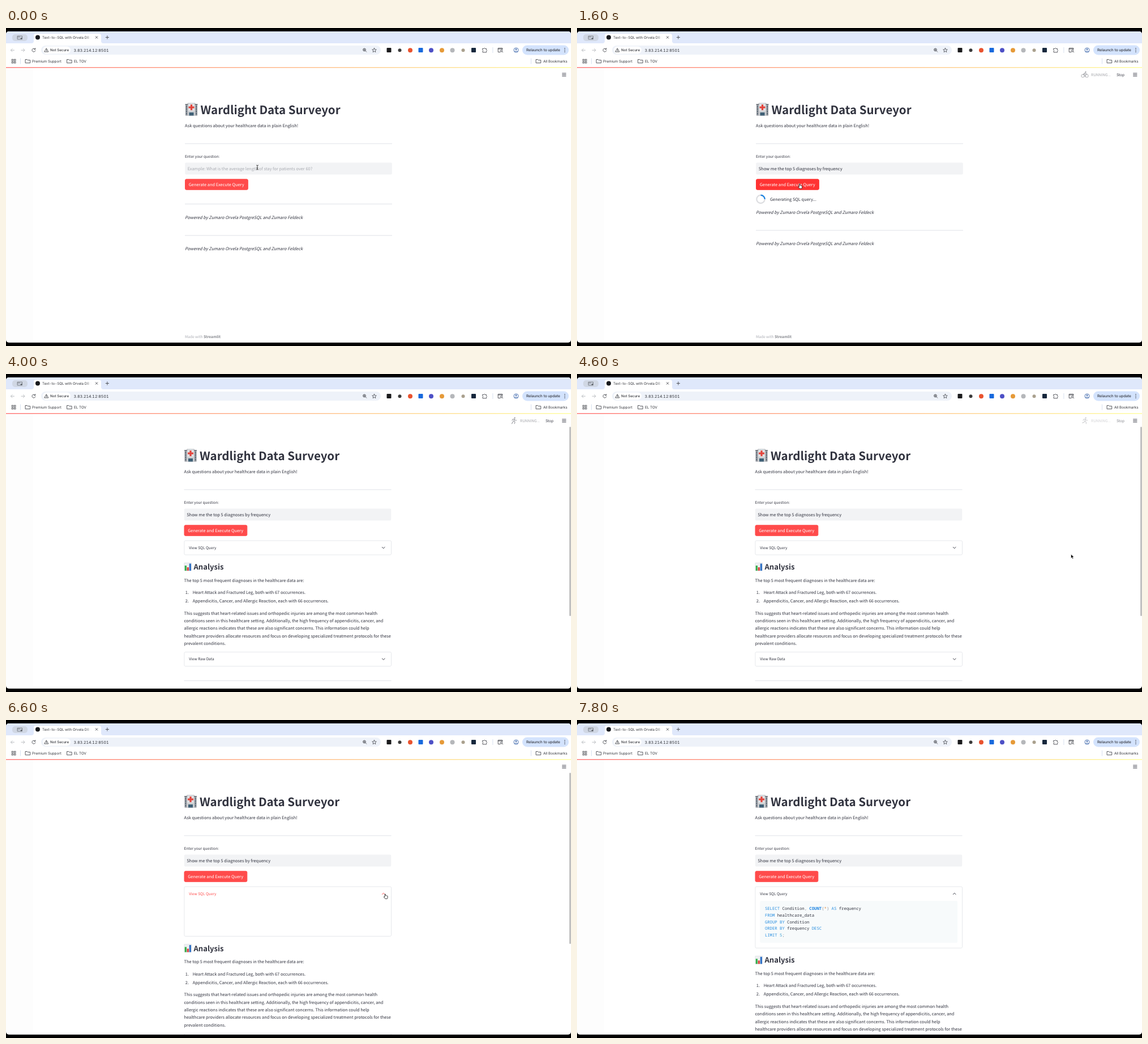
These frames come from a looping animation (998 by 561 pixels, 8 s). An HTML page:

```html
<!DOCTYPE html>
<html lang="en">
<head>
<meta charset="utf-8">
<title>Text-to-SQL demo</title>
<style>
html, body { margin: 0; width: 100%; height: 100%; overflow: hidden; background: #000; }
svg { display: block; width: 998px; height: 561px; }
text { text-rendering: geometricPrecision; white-space: pre; }
.page text { font-family: "Noto Sans CJK JP", "Noto Sans CJK SC", "Noto Sans CJK KR", "Open Sans", sans-serif; fill: #31333f; }
.chrome text { font-family: Inter, Roboto, sans-serif; fill: #32343a; font-feature-settings: "tnum"; }
.page .code { font-family: "Noto Sans Mono", "DejaVu Sans Mono", monospace; }
.line { fill: none; stroke-linecap: round; stroke-linejoin: round; }
</style>
</head>
<body>
<svg viewBox="0 0 998 561">
  <defs>
    <linearGradient id="strip"><stop stop-color="#ff4b4b"/><stop offset="1" stop-color="#fffd80"/></linearGradient>
    <linearGradient id="fade"><stop stop-color="#fff" stop-opacity="0"/><stop offset="1" stop-color="#fff"/></linearGradient>
  </defs>
  <rect y="6" width="998" height="549" rx="5" fill="#fff"/>
  <rect y="71" width="48" height="479" fill="#fdfdfd"/>
  <g class="page" id="page"></g>
  <g class="chrome" id="chrome"></g>
  <rect y="555" width="998" height="6"/>
  <g id="pointer"></g>
</svg>
<script>
const LOOP = 8000, STEP = 200;
const BODY = 7.45, SMALL = 6.52;
const INK = '#31333f', RED = '#ff4b4b', BLUE = '#1c83e1', EDGE = '#e0e2e7';
const QUESTION = 'Show me the top 5 diagnoses by frequency';
const CREDIT = 'Powered by Zumaro Orvela PostgreSQL and Zumaro Feldeck';

const $ = id => document.getElementById(id);
const text = (x, y, s, size = BODY, extra = '') => `<text x="${x}" y="${y}" font-size="${size}" ${extra}>${s}</text>`;
const rect = (x, y, w, h, fill, rx = 0, extra = '') =>
  `<rect x="${x}" y="${y}" width="${w}" height="${h}" fill="${fill}" rx="${rx}" ${extra}/>`;
const dot = (x, y, r, fill, extra = '') => `<circle cx="${x}" cy="${y}" r="${r}" fill="${fill}" ${extra}/>`;
const line = (d, color = '#45474d', w = 0.9) => `<path class="line" d="${d}" stroke="${color}" stroke-width="${w}"/>`;
const at = (x, y, s, extra = '') => `<g transform="translate(${x} ${y})" ${extra}>${s}</g>`;
const fill = color => `style="fill:${color}"`;
const rule = y => rect(316, y - 0.5, 366, 1, EDGE);
const credit = y => text(316, y, CREDIT, BODY, 'font-style="italic"');

function browser() {
  const folder = x => line(`M${x} 55.5h2.8l1 1.2h4.4v5h-8.2z`);
  const ring = (x, y, r) => dot(x, y, r, 'none', 'stroke="#45474d" stroke-width=".9"');
  const tab = 'M45 27q4 0 4-4v-9q0-4 4-4h111q4 0 4 4v9q0 4 4 4z';
  let s = rect(0, 6, 998, 21, '#dfe8fb', 5) + rect(0, 14, 998, 13, '#dfe8fb')
    + rect(0, 27, 998, 42, '#fff')
    + rect(11, 11, 27, 12, '#d0d7e4', 5)
    + line('M20.5 14.2h8v5.6h-8zM20.5 16h4', '#666b73', 0.8) + dot(27, 18.5, 1.4, '#666b73')
    + `<path d="${tab}" fill="#fff"/>` + dot(56, 16.5, 4, '#17191d')
    + text(64, 18.8, 'Text-to-SQL with Orvela DB S', 6.2)
    + rect(140, 11, 11, 12, 'url(#fade)') + rect(151, 11, 3, 12, '#fff')
    + line('M158.2 14.7l3.6 3.6m0-3.6l-3.6 3.6') + line('M176.2 16.5h5.4m-2.7-2.7v5.4')
    + line('M14.5 39.2h-6m2.6-2.6l-2.6 2.6l2.6 2.6M27 39.2h6m-2.6-2.6l2.6 2.6l-2.6 2.6', '#b4b7bc')
    + line('M51.4 37.3a3 3 0 1 0 .5 2.6M51.8 35.6v2.1h-2.1')
    + rect(62, 31, 600, 16, '#eef2f9', 8) + rect(65, 32.5, 49, 13, '#fff', 6.5)
    + line('M71.5 36l3.4 6h-6.8zM71.5 38.2v1.7m0 .9v.1', '#32343a', 0.8)
    + text(78, 41.4, 'Not Secure', 6.2, 'font-weight="500"')
    + text(119.5, 41.6, '3.83.214.12:8501', 7)
    + ring(633, 38.4, 2.4) + line('M634.8 40.2l2 2M631.8 38.4h2.4m-1.2-1.2v2.4', '#45474d', 0.8)
    + line('M650.5 35.4l1.1 2.5 2.7.2-2.1 1.8.7 2.7-2.4-1.5-2.4 1.5.7-2.7-2.1-1.8 2.7-.2z', '#45474d', 0.8);
  const squares = [[676.5, '#1b1b1d'], [732.5, '#1769dd'], [826, '#17283d']];
  const circles = [[695.5, '#3a3a3a', 3], [714, '#e9532f', 4], [751, '#4d50c6', 4], [770, '#e69a38', 4],
    [788.5, '#b5b7ba', 4], [807.5, '#aaa08e', 3]];
  for (const [x, c] of squares) s += rect(x - 4, 35, 8, 8, c, 1);
  for (const [x, c, r] of circles) s += dot(x, 39.2, r, c);
  s += line('M842 36.5h2q1-2.6 2 0h2.5v2.2q2.4 1 0 2.2v2h-6.5v-2q1.8-1.2 0-2.2z')
    + rect(859.5, 34, 0.8, 10, '#cdd9ec')
    + line('M873 42.5h-3.8v-7h7.6v2.6M869.2 37h7.5') + ring(875, 40.3, 1.6) + line('M876.2 41.5l1.4 1.4')
    + dot(901, 39, 4, 'none', 'stroke="#3f69ad" stroke-width=".9"') + dot(901, 37.8, 1.3, '#3f69ad')
    + line('M898.6 41.5q2.4-2 4.8 0', '#3f69ad')
    + rect(912, 30.5, 82, 17, '#d3e3fd', 8.5) + text(919, 41.3, 'Relaunch to update', 6.5, 'font-weight="500"');
  for (const y of [36, 39, 42]) s += dot(987, y, 0.8, '#32343a');
  for (const x of [10.2, 14.4]) for (const y of [55.2, 59.4])
    s += rect(x, y, 2.6, 2.6, 'none', 0, 'stroke="#45474d" stroke-width=".8"');
  s += rect(25, 53.5, 0.8, 10, '#cdd9ec') + folder(34.5) + text(46, 60.5, 'Premium Support', 6.3)
    + folder(108) + text(120, 60.5, 'EL TOV', 6.3)
    + rect(927, 53.5, 0.8, 10, '#cdd9ec') + folder(936.5) + text(949, 60.5, 'All Bookmarks', 6.3);
  return s + rect(0, 69.2, 998, 1.1, 'url(#strip)');
}

function hospital() {
  let s = rect(317, 135, 21, 19.5, '#8e9299', 0.5) + rect(320.5, 132, 14, 22.5, '#c9ccd0', 0.5)
    + rect(316.5, 134, 5, 1.5, '#6e737a') + rect(333.5, 134, 5, 1.5, '#6e737a')
    + rect(322, 133.3, 11, 13, '#dfe1e4')
    + rect(325.9, 135, 3.2, 10, '#e3453d') + rect(322.5, 138.4, 10, 3.2, '#e3453d')
    + rect(323.5, 149, 8, 5.5, '#3f6076');
  for (const y of [138, 142, 146, 150]) s += rect(318, y, 1.6, 2, '#596a78') + rect(335.4, y, 1.6, 2, '#596a78');
  return s;
}

const chart = y => rect(316.3, y - 7, 13, 14, '#eef0f2', 0.5, 'stroke="#d3d7dc" stroke-width=".5"')
  + rect(317.2, y - 2, 3.2, 9, '#35ad4b') + rect(321.2, y + 1, 3.2, 6, '#d8433c') + rect(325.2, y - 5.5, 3.2, 12.5, '#2e6fc4');

function spinner(y, label, angle) {
  const r = 7.2, a = (angle - 45) * Math.PI / 180, b = a + Math.PI / 2;
  const p = v => `${(324.5 + r * Math.cos(v)).toFixed(2)} ${(y + r * Math.sin(v)).toFixed(2)}`;
  return dot(324.5, y, r, 'none', 'stroke="#dcdde0" stroke-width="2.2"')
    + `<path d="M${p(a)}A${r} ${r} 0 0 1 ${p(b)}" fill="none" stroke="${BLUE}" stroke-width="2.2"/>`
    + text(341, y + 2.7, label);
}

function expander(y, label, open = 0, hot = false) {
  const c = hot ? RED : INK, m = y + 12.5, k = open ? -1 : 1;
  return rect(316.4, y, 365.6, 25 + open, '#fff', 2, `stroke="${EDGE}" stroke-width=".8"`)
    + text(324.8, m + 2.4, label, SMALL, fill(c))
    + line(`M665.8 ${m - k * 1.1}l2.4 ${k * 2.3}l2.4 ${-k * 2.3}`, c, 0.95);
}

function query() {
  const kw = s => `<tspan fill="#2a8fe0">${s}</tspan>`, op = s => `<tspan fill="#8b8e98">${s}</tspan>`;
  const rows = [
    `${kw('SELECT')} Condition${op(',')} <tspan fill="#1c83e1" font-weight="700">COUNT</tspan>${op('(')}<tspan fill="#e28a3b">*</tspan>${op(')')} ${kw('AS')} frequency`,
    `${kw('FROM')} healthcare_data`,
    `${kw('GROUP BY')} Condition`,
    `${kw('ORDER BY')} frequency ${kw('DESC')}`,
    `${kw('LIMIT')} <tspan fill="#3d9fd0">5</tspan>${op(';')}`
  ];
  return rect(324.8, 319, 348.7, 74, '#f7fafb', 2)
    + rows.map((s, i) => text(333.4, 335.2 + 11.65 * i, s, 7.28, 'class="code"')).join('');
}

function analysis(dy) {
  const prose = [
    'This suggests that heart-related issues and orthopedic injuries are among the most common health',
    'conditions seen in this healthcare setting. Additionally, the high frequency of appendicitis, cancer, and',
    'allergic reactions indicates that these are also significant concerns. This information could help',
    'healthcare providers allocate resources and focus on developing specialized treatment protocols for these',
    'prevalent conditions.'
  ];
  return at(0, dy, chart(340) + text(333, 345.2, 'Analysis', 13.04, 'font-weight="600"')
    + text(316, 366.6, 'The top 5 most frequent diagnoses in the healthcare data are:')
    + text(318.3, 388.2, '1.') + text(331.2, 388.2, 'Heart Attack and Fractured Leg, both with 67 occurrences.')
    + text(318.3, 403.2, '2.') + text(331.2, 403.2, 'Appendicitis, Cancer, and Allergic Reaction, each with 66 occurrences.')
    + prose.map((s, i) => text(316, 424.8 + 13.31 * i, s)).join('')
    + expander(490.5, 'View Raw Data') + rule(541));
}

function status(t) {
  const bike = dot(-3.6, 2.2, 2.6, 'none', 'stroke="#a3a4a9" stroke-width=".9"')
    + dot(3.6, 2.2, 2.6, 'none', 'stroke="#a3a4a9" stroke-width=".9"')
    + dot(1.4, -4.6, 1.2, '#a3a4a9') + line('M-3 -.2l3-2.6 1.8 1.6h2M-1.8 -.8l2 1.4v3', '#a3a4a9', 1.1);
  const legs = t % 400 ? 'M0 .6l-1.5 2.4l-2.8 .8M0 .6l2.2 1.8l.2 3' : 'M0 .6l-2 2l-1.5 2.8M0 .6l2 1.4l-.8 3.4';
  const runner = dot(1.6, -4.8, 1.2, '#a3a4a9')
    + line(`M1 -2.8l-1 3.4M1 -2.8l-3 .4l-1 2M1 -2.8l1.4 2l2 .2${legs}`, '#a3a4a9', 1.2);
  const fade = t < 4400 ? 1 : t < 4600 ? 0.75 : t < 4800 ? 0.5 : 0.2;
  return `<g opacity="${fade}">` + at(897, 82.3, t < 2000 ? bike : runner)
    + text(908, 84.7, 'RUNNING...', SMALL, fill('#a3a4a9')) + '</g>'
    + text(953, 84.8, 'Stop', SMALL, `opacity="${t < 4400 ? 1 : fade + 0.1}"`);
}

function form(t) {
  const typed = Math.round(QUESTION.length * Math.min(1, Math.max(0, (t - 200) / 600)));
  const focus = t >= 200 && t < 1000, hover = t >= 1000 && t < 1400, down = t >= 1400 && t < 2200;
  const border = focus ? RED : hover ? '#d3d6dc' : 'none';
  return hospital()
    + text(343.6, 151.6, 'Wardlight Data Surveyor', 20.5, 'font-weight="700"')
    + text(316, 174.6, 'Ask questions about your healthcare data in plain English!') + rule(204)
    + text(316, 229.3, 'Enter your question:', SMALL)
    + rect(316.3, 237.6, 365.5, 20.8, '#f2f3f5', 2, `stroke="${border}" stroke-width=".8"`)
    + (typed ? text(320.7, 250.7, QUESTION.slice(0, typed))
      : text(320.7, 250.7, 'Example: What is the average length of stay for patients over 60?', BODY, fill('#a9abb2')))
    + rect(316.5, 266.8, 110.8, 18.5, hover ? '#fff' : down ? '#ff3333' : RED, 2,
      `stroke="${down ? '#ff3333' : RED}"`)
    + text(322.7, 278.8, 'Generate and Execute Query', BODY, fill(hover ? RED : '#fff'));
}

function results(t) {
  if (t < 1400) return rule(310.5) + credit(336.8) + rule(366) + credit(392.2);
  const turn = 0.35 * (t - 1600) - 45 + 90;
  if (t < 4000) {
    let s = spinner(302, 'Generating SQL query...', turn - 90);
    if (t < 2000) return s + credit(328) + rule(357) + credit(383.2);
    s += expander(319, 'View SQL Query') + spinner(360.5, 'Executing query...', turn + 30);
    return t < 2400 ? s : s + spinner(385.5, 'Generating insights...', turn + 15);
  }
  const open = t < 6600 ? 0 : t < 6800 ? 62.5 : 83.3;
  return expander(294, 'View SQL Query', open, t >= 6200 && t < 7600)
    + (t >= 6800 ? query() : '') + analysis(open);
}

function page(t) {
  let s = at(t < 4000 ? 0 : -1.5, 0, form(t) + results(t));
  if (t < 4000) s += text(316, 546.8, 'Made with <tspan font-weight="600" fill="#85878d">Streamlit</tspan>', SMALL, fill('#a9abb2'));
  if (t >= 1400 && t < 5000) s += status(t);
  s += line('M982.6 79.9h6.4m-6.4 2.5h6.4m-6.4 2.5h6.4', INK, 0.9);
  if (t >= 4000 && t < 7800) s += rect(995, 93, 3, t < 6600 ? 334 : t < 6800 ? 302 : 292, '#c1c1c1', 1.5);
  return s;
}

const ARROW = '<path d="M0 0v7.2l1.7-1.6 1.2 2.7 1.3-.6-1.2-2.6h2.3z" fill="#000" stroke="#fff" stroke-width=".6"/>';
const BEAM = line('M-1.6 -4q1.6 0 1.6 1v6q0 1-1.6 1M1.6 -4q-1.6 0-1.6 1M1.6 4q-1.6 0-1.6-1M-.9 .9h1.8', '#222', 0.8);
const HAND = '<path d="M-1.5 -3.6q.9-.9 1.5.2v2.1q.8-.5 1.3.2q.8-.4 1.2.4q1-.2 1.1.8v2q-.1 1.2-.7 2.2h-3.6q-1.2-1.4-2.5-3.2q.2-1.1 1.7 0z" fill="#fff" stroke="#111" stroke-width=".8"/>';
const PATH = [[0, 444, 246], [400, 444, 246], [1000, 394, 279], [2200, 394, 279], [2201, 872.5, 318],
  [5000, 872.5, 318], [6200, 670.5, 311], [7200, 670.5, 311], [7600, 760, 330]];

function pointer(t) {
  if (t >= 7600 || (t >= 2200 && t < 4200)) return '';
  const i = PATH.findIndex(k => k[0] > t), [a, x, y] = PATH[i - 1], [b, X, Y] = PATH[i];
  const u = (t - a) / (b - a), e = u * u * (3 - 2 * u);
  const shape = t < 600 ? BEAM : (t >= 1000 && t < 2200) || (t >= 6200 && t < 7400) ? HAND : ARROW;
  return at(x + (X - x) * e, y + (Y - y) * e, shape);
}

let shown = -1;
function tick(now) {
  let t = Math.floor((now % LOOP) / STEP) * STEP;
  if (t === 2800 || t === 3800) t -= STEP; // brief stalls
  if (t !== shown) {
    shown = t;
    $('page').innerHTML = page(t);
    $('pointer').innerHTML = pointer(t);
  }
  requestAnimationFrame(() => tick(performance.now()));
}
$('chrome').innerHTML = browser();
tick(performance.now());
</script>
</body>
</html>
```
